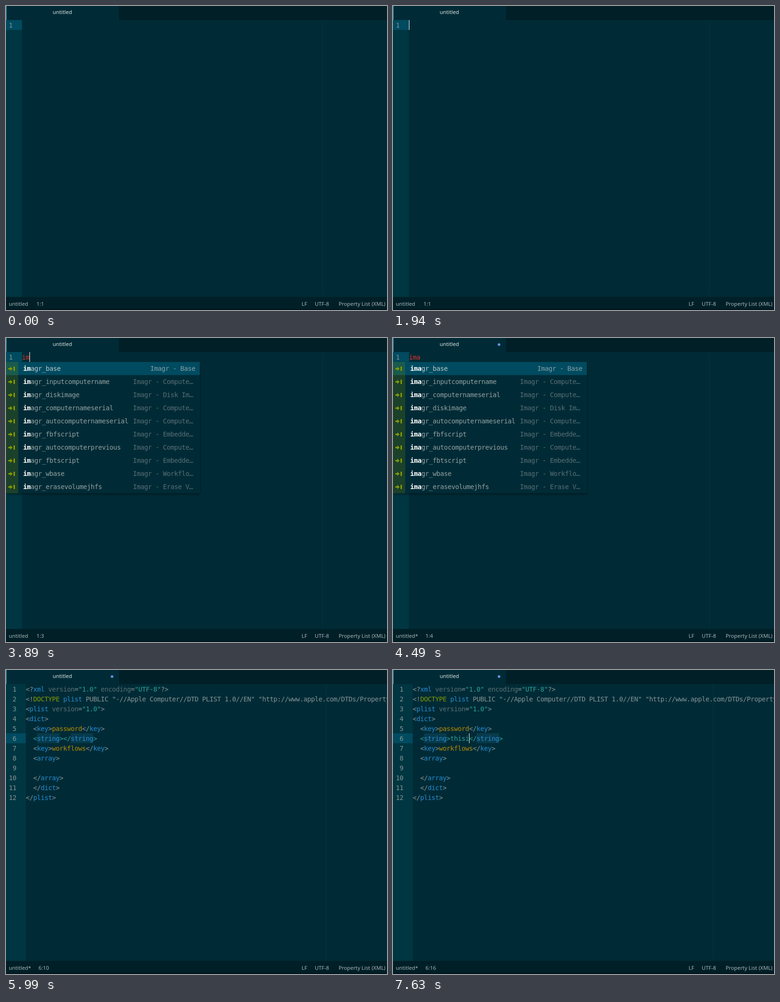
These frames come from a looping animation (812 px wide and 648 px high, 8 s). An HTML page with a canvas:

```html
<!DOCTYPE html>
<html>
<head>
<meta charset="utf-8">
<style>
  html, body { margin: 0; overflow: hidden; background: #002b36; }
  canvas { display: block; }
</style>
</head>
<body>
<canvas width="812" height="648"></canvas>
<script>
const ctx = document.querySelector('canvas').getContext('2d');
const LOOP = 8000, CELL = 8, LINE = 21, TOP = 30, ROW = 28;
const MONO = '14px "DejaVu Sans Mono", monospace';
const UI = '11.3px "Noto Sans", sans-serif';
const BG = '#002b36', BAR = '#001f27', GUTTER = '#003641', ACTIVE = '#004b60';
const COLORS = { n: '#839496', d: '#586e75', b: '#268bd2', c: '#2aa198', g: '#859900', y: '#b58900', r: '#dc322f' };

// "~x" switches to colour x
const DOCUMENT = [
  '~n<?~bxml~d version~n=~c"1.0"~d encoding~n=~c"UTF-8"~n?>',
  '~n<!~gDOCTYPE~b plist~n PUBLIC "-//Apple Computer//DTD PLIST 1.0//EN" "http://www.apple.com/DTDs/PropertyList-1.0.dtd">',
  '~n<~bplist~d version~n=~c"1.0"~n>',
  '~n<~bdict~n>',
  '  ~n<~bkey~n>~ypassword~n</~bkey~n>',
  '',
  '  ~n<~bkey~n>~yworkflows~n</~bkey~n>',
  '  ~n<~barray~n>',
  '',
  '  ~n</~barray~n>',
  '  ~n</~bdict~n>',
  '~n</~bplist~n>',
];
const SUGGESTIONS = [
  ['base', 'Base'], ['inputcomputername', 'Compute…'], ['computernameserial', 'Compute…'],
  ['diskimage', 'Disk Im…'], ['autocomputernameserial', 'Compute…'], ['fbfscript', 'Embedde…'],
  ['autocomputerprevious', 'Compute…'], ['fbtscript', 'Embedde…'], ['wbase', 'Workflo…'],
  ['erasevolumejhfs', 'Erase V…'],
];
const EARLY_ORDER = [0, 1, 3, 2, 4, 5, 6, 7, 8, 9];

// Times at which the caret toggles, starting hidden
const BLINKS = [300, 750, 1200, 1490, 1940, 2390, 2690, 3140, 3590, 4490, 4790, 5240, 5690, 5990, 6440, 6880, 7030];
const SNIPPET_KEYS = [[3740, 'i', '1:2'], [3890, 'im', '1:3'], [4040, 'ima', '1:4']];
const PASSWORD_KEYS = [[4790, '', '6:10'], [7030, 't', '6:12'], [7180, 'thi', '6:14'], [7330, 'this', '6:15'], [7630, 'thisi', '6:16']];

const latest = (keys, t) => keys.filter(k => k[0] <= t).pop() || [0, '', '1:1'];

function rect(x, y, w, h, color) {
  ctx.fillStyle = color;
  ctx.fillRect(x, y, w, h);
}

function label(text, x, y, color) {
  ctx.font = UI;
  ctx.letterSpacing = '0px';
  ctx.fillStyle = color;
  ctx.fillText(text, x, y);
}

function mono(text, x, y, color, weight = '') {
  ctx.font = weight + MONO;
  ctx.letterSpacing = '-0.428px';
  ctx.fillStyle = color;
  ctx.fillText(text, x, y);
}

function codeLine(markup, x, y) {
  for (const part of markup.split('~')) {
    const text = part.slice(COLORS[part[0]] ? 1 : 0);
    mono(text, x, y, COLORS[part[0]] || COLORS.n);
    x += text.length * CELL;
  }
}

function frame(gutter, lines, activeLine) {
  rect(0, 0, 812, 648, BG);
  rect(0, TOP, gutter, 590, GUTTER);
  rect(0, TOP + (activeLine - 1) * LINE, gutter, LINE, ACTIVE);
  rect(gutter + 80 * CELL, TOP, 1, 590, '#023440');
  for (let n = 1; n <= lines; n++) {
    mono(String(n), gutter - 20 - CELL * String(n).length, TOP + n * LINE - 5, COLORS.n);
  }
}

function chrome(modified, position) {
  rect(241, 0, 571, TOP, BAR);
  rect(0, 0, 1, TOP, '#45c8f1');
  label('untitled', 99.5, 17, '#dfe6e7');
  if (modified) {
    ctx.fillStyle = '#6494ed';
    ctx.beginPath();
    ctx.arc(226, 14, 2.8, 0, 7);
    ctx.fill();
  }
  rect(0, 620, 812, 28, BAR);
  rect(0, 646, 812, 2, '#00151b');
  const status = (text, x) => label(text, x, 639, '#a6b6b9');
  status(modified ? 'untitled*' : 'untitled', 6);
  status(position, modified ? 69.3 : 65);
  status('LF', 630);
  status('UTF-8', 658);
  status('Property List (XML)', 709);
}

function icon(y) {
  rect(5, y - 1, 5, 3, COLORS.g);
  ctx.beginPath();
  ctx.moveTo(9, y - 4);
  ctx.lineTo(14, y + .5);
  ctx.lineTo(9, y + 5);
  ctx.fill();
  rect(16, y - 4, 3, 9, COLORS.g);
}

function popup(typed) {
  ctx.shadowColor = 'rgba(0,0,0,.45)';
  ctx.shadowBlur = 5;
  ctx.shadowOffsetY = 2;
  rect(0, 51, 413, 10 * ROW, BG);
  ctx.shadowColor = 'transparent';
  SUGGESTIONS.forEach((_, i) => {
    const [name, title] = SUGGESTIONS[typed.length < 3 ? EARLY_ORDER[i] : i];
    const y = 51 + i * ROW, selected = i === 0;
    if (selected) rect(0, y, 413, ROW, ACTIVE);
    rect(0, y, 26, ROW, selected ? '#1b5b4d' : '#1b412b');
    icon(y + 14);
    mono(typed, 36.5, y + 19, '#fff', 'bold ');
    mono(('imagr_' + name).slice(typed.length), 36.5 + typed.length * CELL, y + 19, selected ? '#b7c6c9' : '#93a1a1');
    const text = 'Imagr - ' + title;
    mono(text, (selected ? 403.5 : 398.5) - text.length * CELL, y + 19, selected ? '#839fa6' : COLORS.d);
  });
}

function snippetScene(t) {
  const [, typed, position] = latest(SNIPPET_KEYS, t);
  frame(34, 1, 1);
  mono(typed, 34, 46, COLORS.r);
  chrome(t >= 4340, position);
  if (typed.length > 1) popup(typed);
  return [34 + typed.length * CELL, TOP];
}

function documentScene(t) {
  const [, typed, position] = latest(PASSWORD_KEYS, t);
  const caret = 122 + typed.length * CELL;
  frame(42, 12, 6);
  rect(66, 135, 48, LINE, '#073b4c');
  rect(caret + 16, 135, 48, LINE, '#073b4c');
  DOCUMENT.forEach((line, i) => codeLine(line, 42, 46 + i * LINE));
  codeLine(`~c<~bstring~c>${typed}</~bstring~c>`, 58, 151);
  chrome(true, position);
  return [caret, 135];
}

function draw(now) {
  const t = now % LOOP;
  const [x, y] = t < 4790 ? snippetScene(t) : documentScene(t);
  if (BLINKS.filter(b => b <= t).length % 2) rect(x, y, 1, LINE, '#fff');
  requestAnimationFrame(draw);
}
requestAnimationFrame(draw);
</script>
</body>
</html>
```
